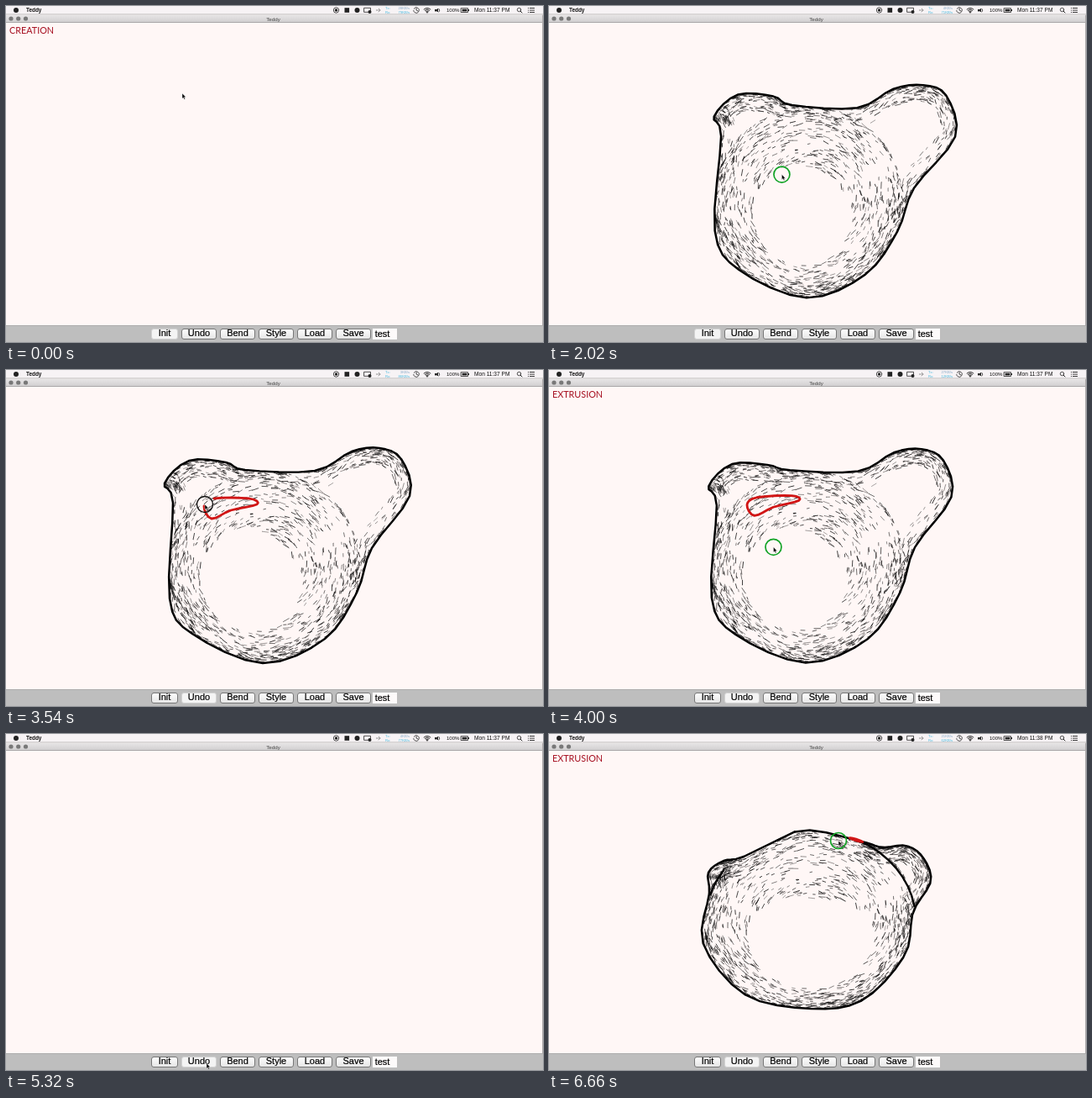
These frames come from a looping animation (640 px wide and 400 px high, 6680 ms). An HTML page with a canvas:

```html
<!DOCTYPE html>
<html lang="en">
<head>
<meta charset="utf-8">
<title>Sketch modeling</title>
<style>
html, body { margin: 0; width: 100%; height: 100%; overflow: hidden; background: #fff7f6; }
canvas, svg { position: absolute; left: 0; top: 0; width: 640px; height: 400px; }
text { font-family: "Liberation Sans", Arial, sans-serif; fill: #111; }
.menu { font-size: 6.6px; }
.net { font-size: 4.2px; fill: #45b9de; }
.btn { font-size: 11px; text-anchor: middle; fill: #000; stroke: #000; stroke-width: .2px; }
#mode { font: 10.8px Lato, "Open Sans", sans-serif; fill: #a60f20; }
</style>
</head>
<body>
<canvas id="c" width="640" height="400"></canvas>
<svg viewBox="0 0 640 400">
  <text class="menu" x="24" y="7.3" font-weight="bold" style="font-size:6.4px">Teddy</text>
  <text x="318.5" y="17.6" text-anchor="middle" style="font-size:6.2px;fill:#444">Teddy</text>
  <text class="net" x="452" y="4.4">Tx:</text>
  <text class="net" x="452" y="9">Rx:</text>
  <text class="net" id="up" x="481" y="4.4" text-anchor="end" style="fill:#86a9c8"></text>
  <text class="net" id="down" x="481" y="9" text-anchor="end"></text>
  <text class="menu" x="525" y="7.3" style="font-size:6px">100%</text>
  <text class="menu" id="clock" x="558" y="7.3"></text>
  <text id="mode" x="4" y="33"></text>
  <g id="labels"></g>
  <text class="btn" x="448.5" y="393.5">test</text>
  <circle id="ring" r="9.5" fill="none"/>
  <path id="arrow" d="M0 0V6.2L1.4 5L2.5 7.2L3.5 6.7L2.5 4.6H4.4Z" fill="#000" stroke="#fff" stroke-width=".4"/>
</svg>
<script>
const LOOP = 6680, RED = '#d11515', INK = '#000';
const $ = id => document.getElementById(id);
const ctx = $('c').getContext('2d');

const pairs = a => a.reduce((r, v, i) => (i % 2 ? r[r.length - 1].push(v) : r.push([v]), r), []);
const mix = (a, b, k) => Array.isArray(a) ? a.map((v, i) => mix(v, b[i], k)) : a + (b - a) * k;
const clamp = v => Math.min(1, Math.max(0, v));
const ease = k => k * k * (3 - 2 * k);

function random(seed) {
  return () => {
    seed = (seed + 0x6D2B79F5) | 0;
    let x = Math.imul(seed ^ (seed >>> 15), 1 | seed);
    x = (x + Math.imul(x ^ (x >>> 7), 61 | x)) ^ x;
    return ((x ^ (x >>> 14)) >>> 0) / 4294967296;
  };
}

// Outlines run clockwise: left ear, head top, right ear, body.
// body: ellipse x, y, rx, ry; lean: side that is hatched deeper;
// gap: curve range without ink; folds: arcs of the body in front of an ear.
const sketch = pairs([197,162, 183,130, 217,103, 262,104, 286,120, 367,122, 415,97, 450,92,
  474,112, 478,160, 436,210, 418,262, 378,314, 325,347, 228,319, 195,258]);
const front = {
  pts: pairs([199,158, 189,135, 218,108, 262,110, 285,119, 368,120, 412,97, 445,93,
    471,106, 481,150, 436,212, 418,265, 380,320, 306,349, 222,314, 195,272]),
  body: [308, 235, 112, 112], lean: [.3, -.3], gap: [0, 0], folds: []
};
const turned = {
  pts: pairs([229,143, 227,118, 252,96, 288,98, 308,114, 365,126, 405,105, 450,99,
    482,108, 496,178, 430,237, 405,280, 365,318, 310,341, 245,315, 208,250]),
  body: [315, 228, 105, 112], lean: [-.5, -.3], gap: [15.2, 16], folds: []
};
const tilted = {
  pts: pairs([205,180, 198,158, 218,136, 250,130, 300,121, 372,123, 405,106, 438,101,
    464,117, 470,160, 436,206, 420,265, 378,322, 305,345, 225,320, 187,265]),
  body: [312, 232, 125, 112], lean: [.2, -.2], gap: [13.65, 13.9], folds: [[-2.6, -2.05]]
};
const bowed = {
  pts: pairs([191,190, 190,165, 208,151, 232,146, 300,115, 372,128, 397,135, 425,133,
    445,146, 455,175, 434,212, 424,263, 375,316, 315,327, 235,311, 184,250]),
  body: [312, 222, 125, 107], lean: [0, -.5], gap: [3, 3.9], folds: [[-2.85, -2.55], [-1.07, -.16]]
};

const POSES = [[1560, front], [1850, front], [2440, turned], [2720, turned], [2980, front],
  [3900, front], [4320, tilted], [5400, tilted], [5700, front], [6240, front], [6660, bowed]];

// Point on a closed Catmull-Rom curve.
function at(pts, u) {
  const n = pts.length, i = Math.floor(u), f = u - i;
  const [a, b, c, d] = [-1, 0, 1, 2].map(k => pts[(i + k + 2 * n) % n]);
  return [0, 1].map(k => b[k] + .5 * f * (c[k] - a[k] +
    f * (2 * a[k] - 5 * b[k] + 4 * c[k] - d[k] + f * (3 * (b[k] - c[k]) + d[k] - a[k]))));
}

function curve(pts, from = 0, to = pts.length) {
  const steps = Math.max(1, Math.ceil((to - from) * 4));
  return Array.from({ length: steps + 1 }, (_, i) => at(pts, mix(from, to, i / steps)));
}

// The first part of a polyline, measured by length.
function part(pts, k) {
  const lens = pts.slice(1).map((p, i) => Math.hypot(p[0] - pts[i][0], p[1] - pts[i][1]));
  let left = lens.reduce((a, b) => a + b, 0) * clamp(k);
  const out = [pts[0]];
  for (let i = 0; i < lens.length && left > 0; i++) {
    out.push(mix(pts[i], pts[i + 1], Math.min(1, left / lens[i])));
    left -= lens[i];
  }
  return out;
}

function line(pts, color, width) {
  ctx.beginPath();
  pts.forEach(p => ctx.lineTo(p[0], p[1]));
  ctx.strokeStyle = color;
  ctx.lineWidth = width;
  ctx.stroke();
}

function span(keys, t) {
  let i = 0;
  while (i < keys.length - 2 && t >= keys[i + 1][0]) i++;
  const a = keys[i], b = keys[i + 1];
  return [a, b, ease(clamp((t - a[0]) / (b[0] - a[0])))];
}

// Body strokes follow the ellipse, rim strokes follow the outline.
const rnd = random(11);
const dashes = Array.from({ length: 2100 }, (_, i) => ({
  rim: i % 3 === 0, u: rnd(), pick: rnd(), depth: rnd() ** 1.7,
  len: 1.2 + rnd() * 2.8, turn: (rnd() - .5) * .6, w: .35 + rnd() * .5
}));

function dash(x, y, dir, d) {
  const dx = Math.cos(dir + d.turn) * d.len, dy = Math.sin(dir + d.turn) * d.len;
  line([[x - dx, y - dy], [x + dx, y + dy]], '#111', d.w);
}

function hatch(pts, [cx, cy, rx, ry], lean) {
  for (const d of dashes) {
    if (d.rim) {
      const u = d.u * pts.length, p = at(pts, u), q = at(pts, u + .1);
      const dir = Math.atan2(q[1] - p[1], q[0] - p[0]), deep = 1 + 20 * d.depth;
      dash(p[0] - Math.sin(dir) * deep, p[1] + Math.cos(dir) * deep, dir, d);
    } else {
      const a = d.u * 2 * Math.PI, c = Math.cos(a), s = Math.sin(a);
      if (d.pick > .75 + .25 * Math.sin(5 * a + 1)) continue;
      const deep = 56 * (1 + lean[0] * c + lean[1] * s) * d.depth - 2;
      dash(cx + (rx - deep) * c, cy + (ry - deep) * s, Math.atan2(ry * c, -rx * s), d);
    }
  }
}

function drawHead(t) {
  const [[, a], [, b], k] = span(POSES, t);
  const [pts, body, lean] = ['pts', 'body', 'lean'].map(key => mix(a[key], b[key], k));
  const near = k < .5 ? a : b, settled = a === b ? 1 : Math.abs(k - .5) * 2;

  const shape = new Path2D();
  curve(pts).forEach(p => shape.lineTo(...p));
  ctx.save();
  ctx.clip(shape);
  hatch(pts, body, lean);
  ctx.restore();

  line(curve(pts, near.gap[1], near.gap[0] + (near.gap[1] ? 0 : pts.length)), INK, 2.5);
  if (near.gap[1]) {
    line(curve(pts, 0, near.gap[0]), INK, 2.5);
    line(curve(pts, near.gap[1], pts.length), INK, 2.5);
  }
  for (const [from, to] of near.folds) {
    ctx.beginPath();
    ctx.ellipse(...body, 0, from, mix(from, to, settled));
    ctx.strokeStyle = INK;
    ctx.lineWidth = 2.3;
    ctx.stroke();
  }
}

const patch = pairs([248,153, 290,153, 299,160, 268,167, 245,177, 236,162]);
const loop = curve(patch, 0, 5);
// The patch swings upright with the surface it lies on.
const swing = ([x, y]) => [236 + (x - 236) * .87, 152 - (x - 236) * .36 + (y - 164) * .3];

const oval = (x, y, rx, ry, tilt) => Array.from({ length: 13 }, (_, i) => {
  const a = i / 6 * Math.PI, c = rx * Math.cos(a);
  return [x + c, y + ry * Math.sin(a) + c * tilt];
});
const loop2 = oval(372, 160, 25, 9, 0), loop2Bowed = oval(366, 126, 8, 1, .3);

// Strokes made by the pointer: start, end, line.
const STROKES = [[180, 1340, curve(sketch)], [3320, 3540, loop], [5840, 6140, loop2]];
const progress = (t, i) => clamp((t - STROKES[i][0]) / (STROKES[i][1] - STROKES[i][0]));

function drawPatches(t) {
  if (t >= 3320 && t < 3580) line(part(loop, progress(t, 1)), RED, 2.8);
  else if (t >= 3580 && t < 5200)
    line(curve(mix(patch, patch.map(swing), ease(clamp((t - 3900) / 420)))), RED, 2.8);
  if (t >= 5840)
    line(part(mix(loop2, loop2Bowed, ease(clamp((t - 6240) / 420))), progress(t, 2)), RED, 2.4);
}

const PATH = [[0, [210, 104]], [180, [197, 162]], [1340, [197, 162]], [1480, [263, 178]],
  [2460, [288, 217]], [2640, [236, 390]], [2730, [300, 230]], [3320, [248, 153]], [3540, [237, 160]],
  [4320, [285, 240]], [4640, [240, 157]], [5240, [239, 390]], [5320, [239, 392]],
  [5440, [290, 290]], [5840, [397, 160]], [6140, [397, 160]], [6260, [350, 190]], [6660, [345, 127]]];

function pointer(t) {
  const i = STROKES.findIndex(([from, to]) => t > from && t < to);
  if (i >= 0) return part(STROKES[i][2], progress(t, i)).pop();
  const [a, b, k] = span(PATH, t);
  return mix(a[1], b[1], k);
}

function rect(x, y, w, h, color) {
  ctx.fillStyle = color;
  ctx.fillRect(x, y, w, h);
}

function disc(x, y, r, color = '#222') {
  ctx.fillStyle = color;
  ctx.beginPath();
  ctx.arc(x, y, r, 0, 7);
  ctx.fill();
}

function arc(x, y, r, from = 0, to = 7, width = .8) {
  ctx.strokeStyle = '#222';
  ctx.lineWidth = width;
  ctx.beginPath();
  ctx.arc(x, y, r, from, to);
  ctx.stroke();
}

function fade(y, h, top, bottom) {
  const g = ctx.createLinearGradient(0, y, 0, y + h);
  g.addColorStop(0, top);
  g.addColorStop(1, bottom);
  return g;
}

function drawMenu() {
  rect(0, 0, 640, 10, '#f7f3f5');
  rect(0, 9.5, 640, 1, '#b4b1b2');
  rect(0, 10.5, 639, 9, fade(10, 10, '#e9e7e8', '#cfcdce'));
  rect(0, 19, 639, 1, '#aaa8a9');
  for (const x of [6, 14.7, 23.5]) disc(x, 15, 2.6, '#787878');
  disc(12, 5, 3);
  arc(393.5, 5, 3.2);
  disc(393.5, 5, 1.7);
  rect(403.5, 2.2, 5.6, 5.6, '#222');
  disc(418.5, 5, 3);
  ctx.strokeRect(427, 2.3, 7.5, 5);
  disc(433.5, 7, 2);
  line([[441, 5], [446, 5]], '#888', .8);
  line([[444, 3], [446, 5], [444, 7]], '#888', .8);
  arc(489, 5, 3.3, -2.6, 3);
  line([[489, 2.8], [489, 5], [491, 6]], '#222', .8);
  for (const r of [2, 3.8, 5.6]) arc(502, 8, r, -2.35, -.8, 1);
  disc(502, 7.6, .9);
  rect(511, 4, 2, 2.4, '#222');
  line([[513, 5], [514.5, 3.3], [514.5, 7], [513, 5]], '#222', 1);
  arc(514, 5.2, 2.7, -.8, .8);
  ctx.strokeRect(542.5, 2.7, 8, 4.8);
  rect(543.6, 3.8, 5.8, 2.6, '#222');
  rect(551, 4, 1, 2, '#222');
  arc(611.5, 4.5, 2.2);
  line([[613, 6], [615, 8]], '#222', 1);
  for (const y of [2.5, 5, 7.5]) {
    rect(622, y - .4, 1, .9, '#222');
    rect(624, y - .4, 6, .9, '#222');
  }
}

const BUTTONS = ['Init', 'Undo', 'Bend', 'Style', 'Load', 'Save'].map((name, i) => {
  const w = i ? 42 : 32, x = i ? 163 + 46 * i : 173;
  const label = document.createElementNS('http://www.w3.org/2000/svg', 'text');
  label.setAttribute('class', 'btn');
  label.setAttribute('x', x + w / 2);
  label.setAttribute('y', 393);
  label.textContent = name;
  $('labels').append(label);
  return { x, w };
});

function drawBar(t) {
  rect(0, 380, 640, 20, '#bebebe');
  rect(0, 380, 640, 1, '#adadad');
  const focus = t < 2640 ? 0 : 1;
  BUTTONS.forEach(({ x, w }, i) => {
    ctx.beginPath();
    ctx.roundRect(x + .5, 384.5, w - 1, 12, 2.5);
    ctx.fillStyle = i === focus ? '#f4f4f4' : fade(384, 12, '#fff', '#e6e6e6');
    ctx.fill();
    ctx.strokeStyle = i === focus ? '#d2d2d2' : '#777';
    ctx.lineWidth = 1;
    ctx.stroke();
  });
  rect(437, 384, 29, 13, '#fdfafa');
  rect(639, 11, 1, 369, '#b0acad');
}

function drawLabels(t) {
  $('mode').textContent = t < 1560 ? 'CREATION' : (t >= 3640 && t < 5200) || t >= 6200 ? 'EXTRUSION' : '';
  $('clock').textContent = t < 6140 ? 'Mon 11:37 PM' : 'Mon 11:38 PM';
  const net = random(Math.floor(t / 240) + 31);
  $('up').textContent = Math.floor(2 + net() * 40) + 'KB/s';
  $('down').textContent = Math.floor(4 + net() * 90) + 'KB/s';
}

function drawPointer(t, solid) {
  const [x, y] = pointer(t), [a, b] = span(POSES, t);
  const move = `translate(${x} ${y})`, turning = a[1] !== b[1];
  $('arrow').setAttribute('transform', move);
  const ring = $('ring');
  ring.setAttribute('transform', move);
  ring.setAttribute('visibility', solid && y < 370 ? 'visible' : 'hidden');
  ring.setAttribute('stroke', turning || t < 2560 ? '#12a326' : '#111');
  ring.setAttribute('stroke-width', turning ? 1.7 : 1.4);
}

function draw(t) {
  ctx.lineCap = ctx.lineJoin = 'round';
  rect(0, 0, 640, 400, '#fff7f6');
  const solid = t >= 1560 && (t < 5200 || t >= 5420);
  if (t > 180 && t < 1560) line(part(STROKES[0][2], progress(t, 0)), RED, 2.8);
  if (solid) {
    drawHead(t);
    drawPatches(t);
  }
  drawMenu();
  drawBar(t);
  drawLabels(t);
  drawPointer(t, solid);
}

const start = performance.now();
function tick() {
  draw((performance.now() - start) % LOOP);
  requestAnimationFrame(tick);
}
tick();
</script>
</body>
</html>
```
